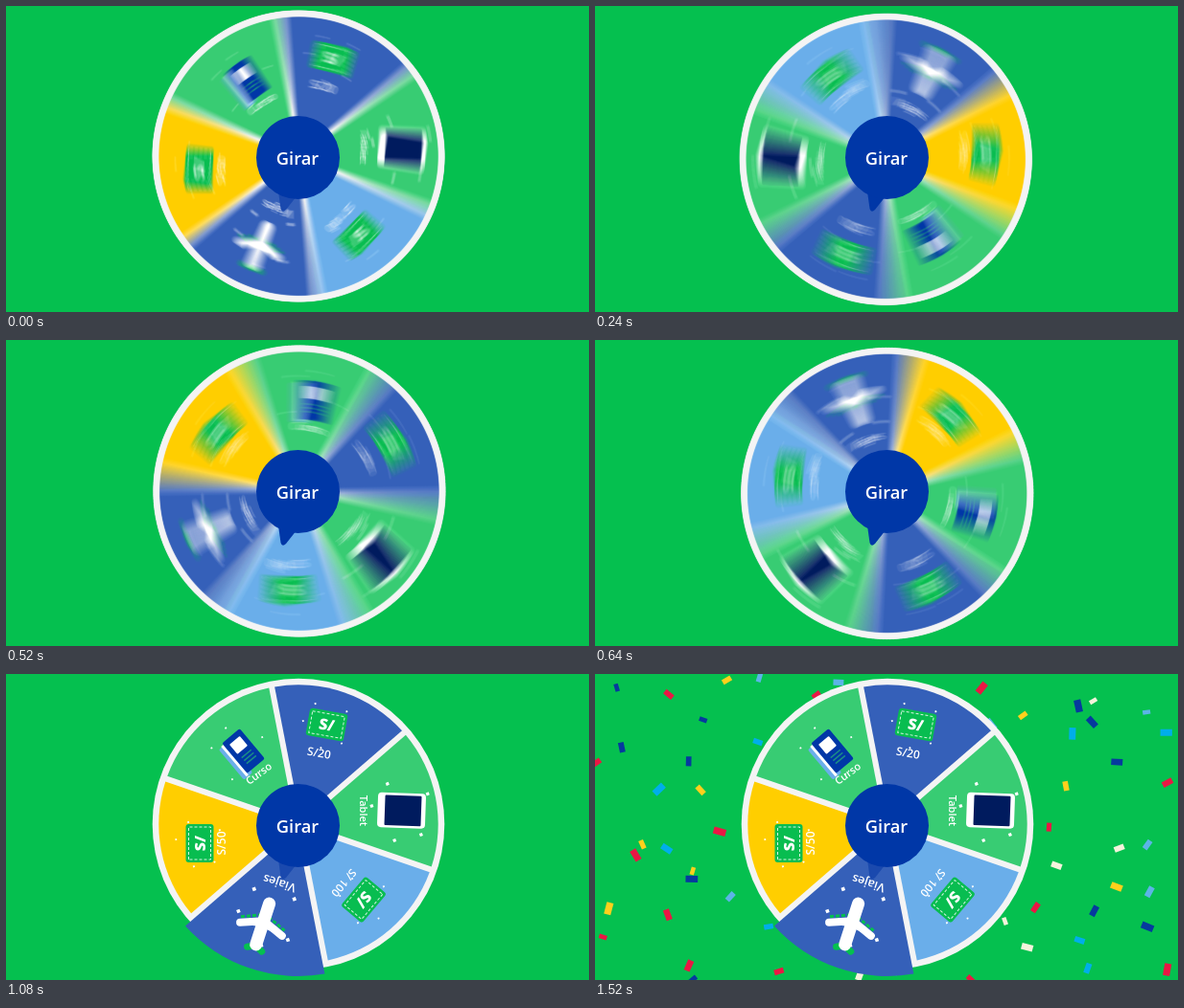
An HTML page with a canvas that plays this animation: 608 by 320 pixels, repeating every 3160 ms.

```html
<!DOCTYPE html>
<html lang="es">
<head>
<meta charset="utf-8">
<style>
html, body { margin: 0; width: 100%; height: 100%; overflow: hidden; background: #05c04f; }
canvas { display: block; }
</style>
</head>
<body>
<canvas id="stage" width="608" height="320"></canvas>
<script>
const W = 608, H = 320, LOOP = 3160, STEP = 40, TAU = Math.PI * 2, RAD = Math.PI / 180;
const SPIN = 920, TURNS = 2, POP_END = 1080, POP = 1.09, SHUTTER = 9;
const CX = 305, CY = 157, PIVOT_X = 304.2, PIVOT_Y = 158.7;
const GREEN = '#05c04f', MINT = '#38cc73', BLUE = '#3560b9', SKY = '#6aaeea', NAVY = '#0037a7', WHITE = '#fff';

const ctx = document.getElementById('stage').getContext('2d');
const sprite = document.createElement('canvas');
sprite.width = W * 2;
sprite.height = H * 2;

const clamp = (v, lo, hi) => Math.min(hi, Math.max(lo, v));

function at(c, x, y, deg, draw) {
  c.save();
  c.translate(x, y);
  c.rotate(deg * RAD);
  draw();
  c.restore();
}

function box(c, color, x, y, w, h, r = 0) {
  c.fillStyle = color;
  c.beginPath();
  c.roundRect(x, y, w, h, r);
  c.fill();
}

function disc(c, color, x, y, r) {
  c.fillStyle = color;
  c.beginPath();
  c.arc(x, y, r, 0, TAU);
  c.fill();
}

// Mirrored line from a wing tip over the middle to the other tip.
function vee(c, color, width, span, tipY, midY, dash = []) {
  c.strokeStyle = color;
  c.lineWidth = width;
  c.setLineDash(dash);
  c.beginPath();
  c.moveTo(-span, tipY);
  c.lineTo(0, midY);
  c.lineTo(span, tipY);
  c.stroke();
}

function label(c, str, x, y, deg, size, weight = 600) {
  at(c, x, y, deg, () => {
    c.font = `${weight} ${size}px "Open Sans", "Noto Sans", sans-serif`;
    c.fillStyle = WHITE;
    c.textAlign = 'center';
    c.fillText(str, 0, size * 0.36);
  });
}

// Diamonds in a ring around an icon.
function sparkles(c, x, y, r, size) {
  for (let i = 0; i < 5; i++) {
    const a = i * 2.4 + .9;
    at(c, x + r * Math.cos(a), y + r * Math.sin(a), 70, () => box(c, WHITE, -size, -size, size * 2, size * 2));
  }
}

// Slice between two separators that are 6 px wide.
function slice(c, start, r, color) {
  const mid = (start + 30) * RAD, gap = Math.asin(3 / r);
  c.fillStyle = color;
  c.beginPath();
  c.moveTo(CX + 6 * Math.cos(mid), CY + 6 * Math.sin(mid));
  c.arc(CX, CY, r, start * RAD + gap, (start + 60) * RAD - gap);
  c.fill();
}

function voucher(c, x, y, deg) {
  sparkles(c, x, y, 25, .9);
  at(c, x, y, deg, () => {
    box(c, '#08bd50', -20, -14.5, 40, 29, 3);
    c.strokeStyle = '#d5f5e1';
    c.setLineDash([3, 2]);
    c.strokeRect(-17, -11.5, 34, 23);
    label(c, 'S/', 0, 0, 0, 16, 800);
  });
}

function book(c) {
  sparkles(c, 243, 82, 29, .9);
  at(c, 245, 82, -40, () => {
    box(c, SKY, -16, -17, 12, 41, 2);
    box(c, WHITE, -12, -18, 3, 41);
    box(c, NAVY, -9, -20, 24, 41, 2);
    box(c, WHITE, -4, -14, 14, 13, 1);
    for (let y = 4; y < 14; y += 4) box(c, '#1c8f86', -3, y, 13, 1.5);
  });
}

function tablet(c) {
  sparkles(c, 413, 143, 32, 1.6);
  at(c, 412.5, 143, 2, () => {
    box(c, WHITE, -25, -18.5, 50, 36.5, 4);
    box(c, '#001b5e', -17.5, -16, 38, 31.5, 1);
  });
}

function plane(c) {
  sparkles(c, 274, 253, 32, 1.8);
  at(c, 267.5, 262, 18, () => {
    c.lineCap = 'butt';
    vee(c, GREEN, 3, 24, -1, -11, [4, 2]);
    c.lineCap = c.lineJoin = 'round';
    vee(c, GREEN, 7, 8, 27, 23);
    vee(c, WHITE, 8, 23, 5, -4);
    vee(c, WHITE, 7, 13, 1, -1);
    c.lineWidth = 13;
    c.beginPath();
    c.moveTo(0, -23);
    c.lineTo(0, 22);
    c.stroke();
  });
}

function wheel(c, scale) {
  disc(c, '#f4f4f4', CX, CY, 152.3);
  [BLUE, MINT, SKY, BLUE, '#ffce00', MINT].forEach((color, i) => {
    if (i !== 3) slice(c, i * 60 - 101, 145.7, color);
  });

  voucher(c, 334.5, 53, 10);
  voucher(c, 373, 236, 130);
  voucher(c, 202, 177, -90);
  tablet(c);
  book(c);
  label(c, 'S/20', 326.5, 82.5, 10, 12);
  label(c, 'S/ 100', 352.5, 218.5, 130, 11.5);
  label(c, 'S/50', 225, 177, -90, 12);
  label(c, 'Tablet', 373, 143, 90, 11);
  label(c, 'Curso', 263.5, 104, -36, 11);

  // The winning slice lies on top and grows.
  c.save();
  c.translate(CX, CY);
  c.scale(scale / POP, scale / POP);
  c.translate(-CX, -CY);
  slice(c, 79, 159, BLUE);
  label(c, 'Viajes', 285, 219, 198, 12.5);
  plane(c);
  c.restore();
}

const angle = t => t / SPIN * 360 * TURNS;

// Averages turned copies while the shutter is open.
function spinning(t) {
  const n = 28, open = Math.max(0, t - SHUTTER), close = Math.min(SPIN, t + SHUTTER);
  for (let i = 0; i < n; i++) {
    ctx.globalAlpha = 1 / (i + 1);
    at(ctx, PIVOT_X, PIVOT_Y, angle(open + (close - open) * (i + .5) / n),
      () => ctx.drawImage(sprite, -PIVOT_X, -PIVOT_Y, W, H));
  }
  ctx.globalAlpha = 1;
}

function hub(moving) {
  ctx.fillStyle = moving ? NAVY : '#1a49ae';
  ctx.beginPath();
  ctx.moveTo(284, 194);
  ctx.lineTo(286.5, 212);
  ctx.quadraticCurveTo(288, 217, 292, 213);
  ctx.lineTo(303, 199);
  ctx.fill();
  disc(ctx, NAVY, 304.5, 158.5, 43.5);
  label(ctx, 'Girar', 304, 159.5, 0, 18.3);
}

// One piece of paper in each cell of a loose grid.
function confetti(t) {
  const colors = ['#ea1744', '#ffd01c', '#ea1744', '#00aeea', '#ffd01c', '#5cb4e6', '#063a9e', '#f5f3dc'];
  const cols = 12, rows = 7;
  let seed = 11;
  const rnd = () => (seed = seed * 16807 % 2147483647) / 2147483647;
  rnd();
  ctx.globalAlpha = clamp((t - 1280) / 240, 0, 1);
  for (let i = 0; i < cols * rows; i++) {
    const x = (i % cols + rnd()) * W / cols, y = (Math.floor(i / cols) + rnd()) * H / rows;
    const w = 8 + 5 * rnd(), h = w * .56, color = colors[Math.floor(rnd() * colors.length)];
    at(ctx, x, y, rnd() * 180, () => box(ctx, color, -w / 2, -h / 2, w, h));
  }
  ctx.globalAlpha = 1;
}

function frame(now) {
  const t = Math.floor((now % LOOP + .5) / STEP) * STEP % LOOP;
  ctx.fillStyle = GREEN;
  ctx.fillRect(0, 0, W, H);
  if (t > 1280) confetti(t);
  if (t <= SPIN) spinning(t);
  else wheel(ctx, 1 + (POP - 1) * clamp((t - SPIN) / (POP_END - SPIN), 0, 1));
  hub(t > 0 && t < SPIN);
  requestAnimationFrame(frame);
}

const sc = sprite.getContext('2d');
sc.scale(2, 2);
wheel(sc, 1);
ctx.imageSmoothingQuality = 'high';
requestAnimationFrame(frame);
</script>
</body>
</html>
```
